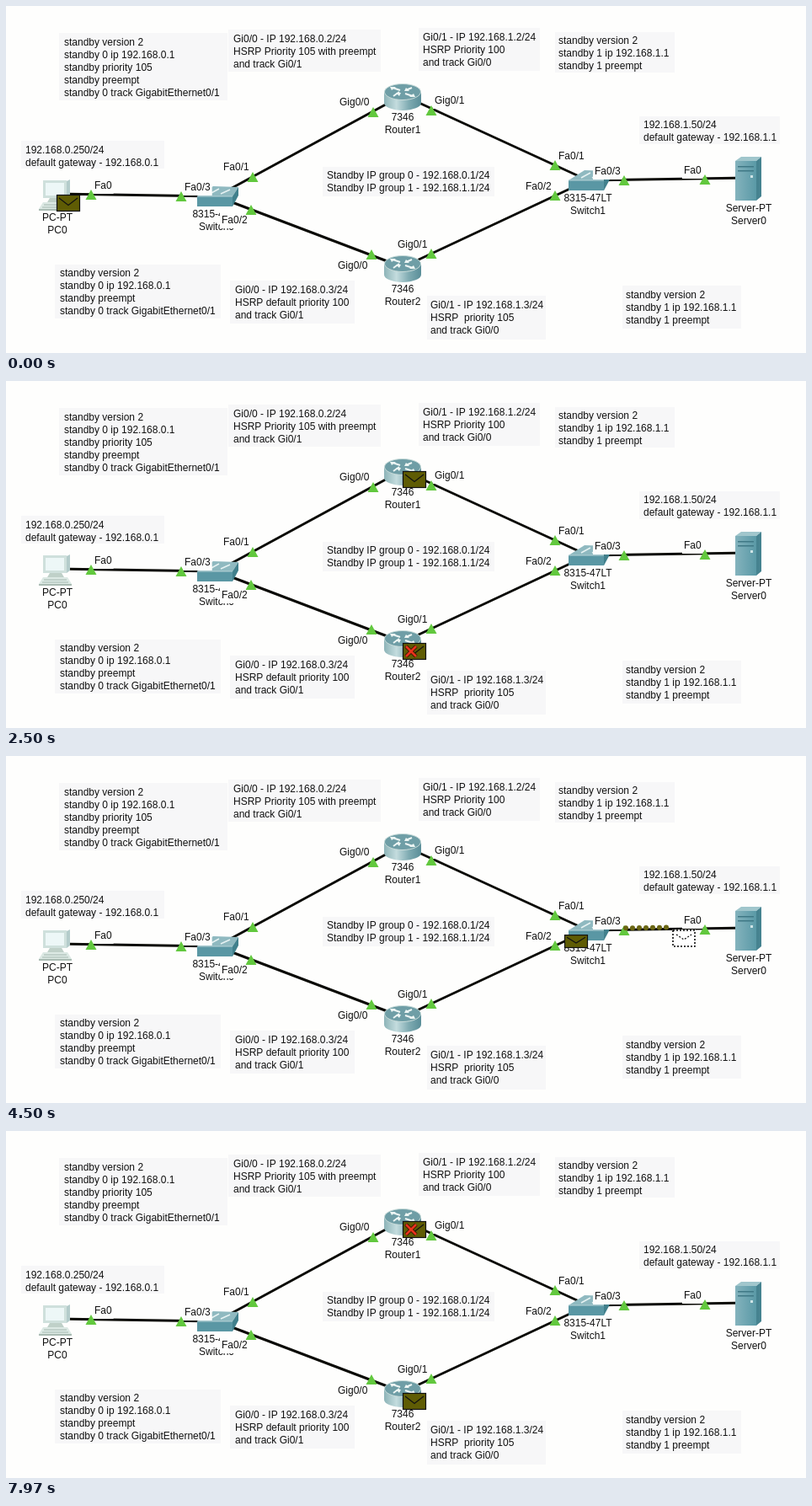
These frames come from a looping animation (950 by 412 pixels, 8 s). An HTML page with a canvas:

```html
<!DOCTYPE html>
<html lang="en">
<head>
<meta charset="utf-8">
<title>Redundant gateway packet flow</title>
<style>
html, body { margin: 0; width: 100%; height: 100%; overflow: hidden; background: #fefefd; }
canvas { display: block; }
</style>
</head>
<body>
<canvas id="stage" width="950" height="412"></canvas>
<script>
const ctx = document.getElementById('stage').getContext('2d');
const LOOP = 8000, FIRST_HOP = 97, HOP = 1413, FLIGHT = 315, UNFOLD = 300;
const PAPER = '#fefefd', OLIVE = '#5f5c04';

const pc = { x: 60, y: 224 }, server = { x: 881, y: 205 };
const switch0 = { x: 250, y: 227, isSwitch: true }, switch1 = { x: 691, y: 208, isSwitch: true };
const router1 = { x: 471, y: 107 }, router2 = { x: 471, y: 311 };

const links = [[pc, switch0], [switch0, router1], [switch0, router2],
  [router1, switch1], [router2, switch1], [switch1, server]];

// sender, receivers, receiver that rejects the packet
const hops = [
  [pc, [switch0]],
  [switch0, [router1, router2], router2],
  [router1, [switch1]],
  [switch1, [server]],
  [server, [switch1]],
  [switch1, [router1, router2], router1]
];

// left, top, right, bottom, text x, first line y, lines
const notes = [
  [63, 32, 263, 112, 69, 43, ['standby version 2', 'standby 0 ip 192.168.0.1', 'standby priority 105',
    'standby preempt', 'standby 0 track GigabitEthernet0/1']],
  [264, 28, 445, 78, 270, 39, ['Gi0/0 - IP 192.168.0.2/24', 'HSRP Priority 105 with preempt', 'and track Gi0/1']],
  [490, 26, 634, 77, 495, 37, ['Gi0/1 - IP 192.168.1.2/24', 'HSRP Priority 100', 'and track Gi0/0']],
  [652, 31, 794, 79, 656, 41, ['standby version 2', 'standby 1 ip 192.168.1.1', 'standby 1 preempt']],
  [752, 131, 919, 164, 757, 141, ['192.168.1.50/24', 'default gateway - 192.168.1.1']],
  [18, 160, 188, 193, 23, 171, ['192.168.0.250/24', 'default gateway - 192.168.0.1']],
  [58, 307, 255, 371, 64, 317, ['standby version 2', 'standby 0 ip 192.168.0.1', 'standby preempt',
    'standby 0 track GigabitEthernet0/1']],
  [266, 326, 414, 377, 272, 337, ['Gi0/0 - IP 192.168.0.3/24', 'HSRP default priority 100', 'and track Gi0/1']],
  [500, 344, 641, 396, 504, 355, ['Gi0/1 - IP 192.168.1.3/24', 'HSRP  priority 105', 'and track Gi0/0']],
  [732, 332, 873, 383, 736, 343, ['standby version 2', 'standby 1 ip 192.168.1.1', 'standby 1 preempt']],
  [376, 191, 580, 226, 381, 201, ['Standby IP group 0 - 192.168.0.1/24', 'Standby IP group 1 - 192.168.1.1/24']]
];

const names = [['PC-PT', 'PC0', 61, 251], ['8315-47LT', 'Switch0', 250, 247], ['7346', 'Router1', 471, 132],
  ['7346', 'Router2', 471, 336], ['8315-47LT', 'Switch1', 691, 228], ['Server-PT', 'Server0', 882, 240]];

const ports = [['Fa0', 105, 213], ['Fa0/3', 212, 215], ['Fa0/1', 258, 191], ['Fa0/2', 256, 254],
  ['Gig0/0', 396, 114], ['Gig0/1', 509, 112], ['Gig0/0', 394, 308], ['Gig0/1', 465, 283],
  ['Fa0/1', 656, 178], ['Fa0/2', 617, 214], ['Fa0/3', 699, 196], ['Fa0', 805, 195]];

const lights = [[101, 224], [208, 226], [293, 203], [291, 242], [436, 126], [505, 124],
  [434, 295], [505, 294], [652, 189], [652, 225], [734, 207], [830, 206]];

function text(str, x, y, align = 'left') {
  ctx.fillStyle = '#111';
  ctx.textAlign = align;
  ctx.fillText(str, x, y + 4);
}

function box(color, x, y, w, h) {
  ctx.fillStyle = color;
  ctx.fillRect(x, y, w, h);
}

function poly(color, ...pts) {
  ctx.fillStyle = color;
  ctx.beginPath();
  for (let i = 0; i < pts.length; i += 2) ctx.lineTo(pts[i], pts[i + 1]);
  ctx.fill();
}

function stroke(color, width, ...pts) {
  ctx.strokeStyle = color;
  ctx.lineWidth = width;
  ctx.beginPath();
  for (let i = 0; i < pts.length; i += 2) ctx.lineTo(pts[i], pts[i + 1]);
  ctx.stroke();
}

function fade(x0, x1, ...colors) {
  const gradient = ctx.createLinearGradient(x0, 0, x1, 0);
  colors.forEach((color, i) => gradient.addColorStop(i / (colors.length - 1), color));
  return gradient;
}

function at({ x, y }, draw) {
  ctx.save();
  ctx.translate(x, y);
  draw();
  ctx.restore();
}

function drawRouter() {
  ctx.fillStyle = fade(-22, 22, '#8db4b8', '#c4dcde', '#7fabb2', '#5a8e98');
  ctx.beginPath();
  ctx.ellipse(0, 8, 22, 9, 0, 0, Math.PI);
  ctx.lineTo(-22, -5);
  ctx.lineTo(22, -5);
  ctx.fill();
  ctx.fillStyle = '#6f9ea6';
  ctx.strokeStyle = '#c9dcda';
  ctx.lineWidth = 1;
  ctx.beginPath();
  ctx.ellipse(0, -5, 21.5, 9.5, 0, 0, 7);
  ctx.fill();
  ctx.stroke();
  for (const s of [-1, 1]) {
    stroke('#eef6f4', 2, s * 3, -5 + s * 2, s * 12, -5 + s * 5);
    stroke('#eef6f4', 2, s * 4, -6 - s, s * 11, -5 - s * 5);
    poly('#eef6f4', s * 15, -5 + s * 6, s * 8, -5 + s * 6, s * 13, -5 + s * 2);
    poly('#eef6f4', s * 2, -5 - s, s * 8, -5 - s, s * 4, -5 - s * 5);
  }
}

function drawSwitch() {
  poly('#8fb9c0', -23, -1, -4, -13, 26, -12, 19, -1);
  poly('#41808c', 19, -1, 26, -12, 26, -2, 19, 11);
  box('#5a97a4', -23, -1, 42, 12);
  stroke('#b5d2d6', 1, -23, -1, 19, -1);
  stroke('#e6f2f2', 1.5, -8, -4, 3, -10);
  stroke('#e6f2f2', 1.5, 5, -4, 16, -9);
}

function drawServer() {
  poly('#a0c6cc', -15, -21, -8, -26, 16, -26, 10, -21);
  poly('#468390', 10, -21, 16, -26, 16, 21, 10, 26);
  box(fade(-15, 10, '#84b3bd', '#5a99a6'), -15, -21, 25, 47);
  box('#3f7885', -12, -15, 19, 1.5);
  box('#3f7885', -12, -10, 19, 1.5);
  box('#cfe4e6', 3, -4, 3, 3);
}

function drawPc() {
  poly('#b4cccb', 12, -16, 16, -18, 16, 1, 12, 4);
  box('#cfe0dc', -16, -17, 28, 21);
  box('#edf7f7', -13, -14, 22, 15);
  poly('#bfd0c8', -8, 4, 6, 4, 9, 9, -11, 9);
  poly('#dce9e4', -16, 9, 13, 9, 18, 17, -21, 17);
  poly('#a9bbb2', -21, 17, 18, 17, 18, 19, -21, 19);
  stroke('#a5b8b0', 1, -15, 12, 12, 12);
  stroke('#a5b8b0', 1, -17, 15, 14, 15);
}

function drawEnvelope(x, y, h = 20) {
  box(OLIVE, x, y, 28, h);
  ctx.strokeStyle = '#111';
  ctx.lineWidth = 1.2;
  ctx.strokeRect(x + .5, y + .5, 27, h - 1);
  stroke('#111', 1.2, x + 3, y + h * .2, x + 14, y + h * .62, x + 25, y + h * .2);
}

function drawGhost(x, y) {
  x = Math.round(x);
  y = Math.round(y);
  box('#fff', x, y, 28, 21);
  ctx.setLineDash([2, 2]);
  ctx.strokeStyle = '#000';
  ctx.lineWidth = 1.5;
  ctx.strokeRect(x + 1, y + 1, 26, 19);
  stroke('#000', 1.2, x + 5, y + 6, x + 14, y + 12, x + 23, y + 6);
  ctx.setLineDash([]);
}

function drawCross(x, y) {
  for (const [color, w] of [['#3a1000', 4.5], ['#e8331c', 2.6]]) {
    stroke(color, w, x - 6, y - 6, x + 6, y + 6);
    stroke(color, w, x + 6, y - 6, x - 6, y + 6);
  }
}

function drawTrail(from, to, progress) {
  const dx = to.x - from.x, dy = to.y - from.y, length = Math.hypot(dx, dy);
  ctx.fillStyle = '#6a6612';
  for (let d = from.isSwitch ? 45 : 4; d < length * progress; d += 8) {
    ctx.beginPath();
    ctx.arc(from.x + dx * d / length, from.y - 3 + dy * d / length, 3, 0, 7);
    ctx.fill();
  }
}

function drawPackets(hop, local) {
  if (!hop) return drawEnvelope(pc.x, pc.y);
  const [from, targets, rejecting] = hop;
  const p = local / FLIGHT;
  if (p < 1) {
    const h = 20 * (1 - .4 * p);
    drawEnvelope(from.x - 28, from.y + 20 - h, h);
    for (const to of targets) drawGhost(from.x + (to.x - from.x) * p, from.y + (to.y - from.y) * p);
    return;
  }
  const open = Math.min((local - FLIGHT) / UNFOLD, 1);
  for (const to of targets) {
    drawEnvelope(to.x, to.y, 20 * (.6 + .4 * open));
    if (to === rejecting && open === 1) drawCross(to.x + 10, to.y + 10);
  }
}

function render(now) {
  const t = now % LOOP;
  const index = Math.floor((t - FIRST_HOP) / HOP);
  const hop = hops[index], local = t - FIRST_HOP - index * HOP;

  box(PAPER, 0, 0, 950, 412);
  ctx.font = '12px "Liberation Sans", Arial, sans-serif';
  for (const [l, top, r, b, x, y, lines] of notes) {
    box('#f7f7f8', l, top, r - l, b - top);
    lines.forEach((line, i) => text(line, x, y + i * 15));
  }
  for (const [a, b] of links) stroke('#0a0a05', 3, a.x, a.y - 1, b.x, b.y - 1);
  at(router1, drawRouter);
  at(router2, drawRouter);
  at(pc, drawPc);
  at(server, drawServer);
  at(switch0, drawSwitch);
  at(switch1, drawSwitch);
  for (const [model, name, x, y] of names) {
    text(model, x, y, 'center');
    text(name, x, y + 15, 'center');
  }
  for (const [label, x, y] of ports) {
    box(PAPER, x - 2, y - 12, ctx.measureText(label).width + 4, 22);
    text(label, x, y);
  }
  for (const [x, y] of lights) poly('#62c83e', x, y - 6, x + 6.5, y + 6, x - 6.5, y + 6);
  if (hop && local < FLIGHT + UNFOLD)
    for (const to of hop[1]) drawTrail(hop[0], to, Math.min(local / FLIGHT, 1));
  drawPackets(hop, local);
  requestAnimationFrame(() => render(performance.now()));
}
render(0);
</script>
</body>
</html>
```
